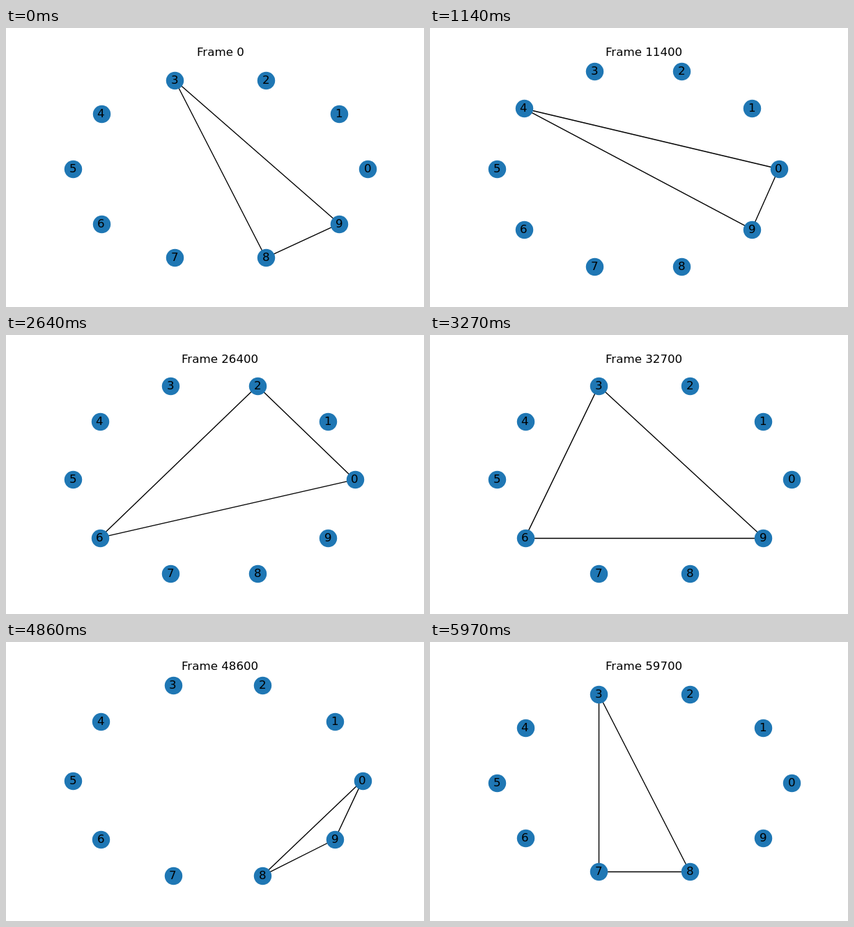
These frames come from a looping animation (600x400 px, 6 s). An HTML page with a canvas:

```html
<!DOCTYPE html>
<html lang="en">
<head>
<meta charset="utf-8">
<title>Triangles on a circular graph</title>
<style>
  html, body { margin: 0; width: 100%; height: 100%; overflow: hidden; background: #fff; }
  canvas { display: block; }
</style>
</head>
<body>
<canvas id="stage" width="600" height="400"></canvas>
<script>
const ctx = document.getElementById('stage').getContext('2d');
const LOOP = 6000, STEP = 30, HOLD = 7;

// Node triples joined by edges, each held for HOLD steps
const triples = ('389 146 057 157 236 049 278 134 145 068 259 147 026 378 015 ' +
  '369 248 056 026 179 345 028 136 089 257 469 035 158 378').split(' ');

const nodes = Array.from({ length: 10 }, (_, i) => {
  const a = i * Math.PI / 5;
  return { x: Math.cos(a), y: Math.sin(a) };
});

// Plot area in pixels, inside its 5% margins
const area = { x0: 75 + 465 / 22, x1: 540 - 465 / 22, y0: 356 - 14, y1: 48 + 14 };

const snap = v => Math.floor(v + 0.5) + 0.5;

// Maps one axis so that all nodes and the padded edge box fit
function scale(key, ids, from, to) {
  const all = nodes.map(n => n[key]);
  const used = ids.map(i => nodes[i][key]);
  const lo = Math.min(...used), hi = Math.max(...used);
  const pad = 0.05 * (hi - lo);
  const min = Math.min(lo - pad, ...all), max = Math.max(hi + pad, ...all);
  return v => from + (v - min) / (max - min) * (to - from);
}

function text(str, cx, baseline) {
  const left = Math.round(cx - ctx.measureText(str).width / 2);
  ctx.fillText(str, left, Math.round(baseline));
}

function edge(a, b) {
  let { x: ax, y: ay } = a, { x: bx, y: by } = b;
  if (Math.abs(ax - bx) < 0.01) ax = bx = snap(ax);
  if (Math.abs(ay - by) < 0.01) ay = by = snap(ay);
  ctx.beginPath();
  ctx.moveTo(ax, ay);
  ctx.lineTo(bx, by);
  ctx.stroke();
}

function draw(step) {
  const ids = [...triples[Math.floor(step / HOLD)]].map(Number);
  const sx = scale('x', ids, area.x0, area.x1);
  const sy = scale('y', ids, area.y0, area.y1);
  const pts = nodes.map(n => ({ x: sx(n.x), y: sy(n.y) }));

  ctx.fillStyle = '#fff';
  ctx.fillRect(0, 0, 600, 400);

  ctx.strokeStyle = '#000';
  ctx.lineWidth = 100 / 72;
  ids.forEach((id, k) => edge(pts[id], pts[ids[(k + 1) % 3]]));

  ctx.fillStyle = '#1f77b4';
  for (const p of pts) {
    ctx.beginPath();
    ctx.arc(snap(p.x), snap(p.y), 12.72, 0, 2 * Math.PI);
    ctx.fill();
  }

  ctx.fillStyle = '#000';
  ctx.font = '16.667px "DejaVu Sans", sans-serif';
  pts.forEach((p, i) => text(String(i), p.x, p.y + 5));
  text('Frame ' + step * 300, 307.5, 40);
}

const start = performance.now();
function tick() {
  const t = Math.max(0, performance.now() - start) % LOOP;
  draw(Math.floor(t / STEP));
  requestAnimationFrame(tick);
}
tick();
</script>
</body>
</html>
```
